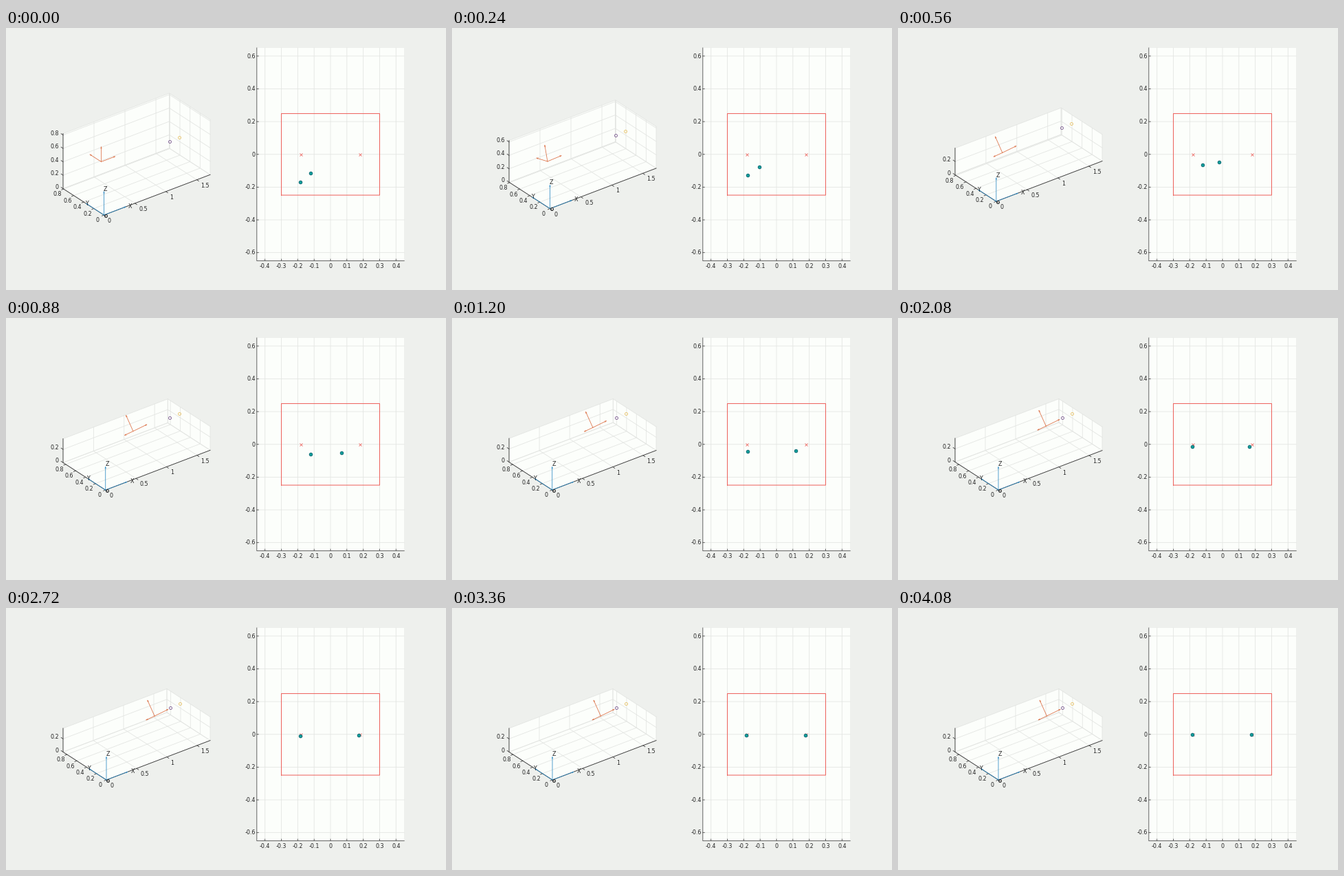
Animation, 640 px wide and 381 px high, one loop 4160 ms. Source, as a matplotlib script:

```python
import numpy as np
import matplotlib.pyplot as plt
from matplotlib.animation import FuncAnimation

W, H, DPI = 640, 381, 100
FRAMES, STEP = 52, 80
PT = 72 / DPI

BG, PANE, GRID, INK = "#eef0ed", "#fcfefb", "#e3e5e2", "#3a3a3a"
BLUE, ORANGE, PURPLE, YELLOW = "#2f8bc4", "#dd7248", "#74508c", "#e8c060"
RED, TEAL = "#ee5f5a", "#12a09c"

plt.rcParams["font.family"] = "DejaVu Sans"
fig = plt.figure(figsize=(W / DPI, H / DPI), dpi=DPI, facecolor=BG)
ax = fig.add_axes([0, 0, 1, 1])
ax.set_xlim(0, W)
ax.set_ylim(H, 0)
ax.axis("off")

live = []


def line(*pts, color=INK, w=0.8, z=2, **kw):
    xs, ys = zip(*pts)
    live.extend(ax.plot(xs, ys, color=color, lw=w * PT, zorder=z, snap=False, **kw))


def text(x, y, s, ha="center"):
    live.append(ax.text(x, y, s, ha=ha, va="center", size=8 * PT, color="#262626", zorder=6))


def fill(pts):
    live.extend(ax.fill(*zip(*pts), fc=PANE, ec="none", zorder=0))


def mark(p, shape, size, edge, w, face="none", z=5):
    live.extend(ax.plot(*p, shape, ms=size * PT, mfc=face, mec=edge, mew=w * PT,
                        zorder=z, snap=False))


def arrow(p, v, color, head=2.2):
    tip = p + v
    back = -v / np.hypot(*v) * head
    side = np.array([-back[1], back[0]]) * 0.35
    line(p, tip, color=color, z=4)
    line(tip + back + side, tip, tip + back - side, color=color, w=0.6, z=4)


def fall(t, half, power):
    """Ease from 1 to 0, passing one half at the given time."""
    return 1 / (1 + (t / half) ** power)


def bump(t, mid, width):
    return np.exp(-((t - mid) / width) ** 2)


def smooth(s):
    s = min(max(s, 0), 1)
    return s * s * (3 - 2 * s)


def scene(t):
    # The box flattens about its centre while the camera sinks.
    sink = np.exp(-(t / 0.34) ** 1.7)
    o = np.array([146 - 3.5 * fall(t, 0.8, 6), 250 + 22 * sink])
    xm = 1.716
    unit = (297 - o[0]) / xm
    ux = unit * np.array([1, -0.38])
    uy = unit * np.array([-0.815, -0.526])
    uz = unit * np.array([0, -1.083])
    ym, zm = (o[0] - 83) / -uy[0], (34.4 + 45.6 * sink) / -uz[1]

    def p(x, y, z):
        return o + x * ux + y * uy + z * uz

    fill([p(0, 0, 0), p(xm, 0, 0), p(xm, 0, zm), p(xm, ym, zm), p(0, ym, zm), p(0, ym, 0)])
    xt, yt, zt = np.arange(0, xm, 0.5), np.arange(0, ym, 0.2), np.arange(0, zm, 0.2)
    grid = dict(color=GRID, z=1)
    for x in [*xt, xm]:
        line(p(x, 0, 0), p(x, ym, 0), p(x, ym, zm), **grid)
    for y in [*yt, ym]:
        line(p(0, y, 0), p(xm, y, 0), p(xm, y, zm), **grid)
    for z in [*zt, zm]:
        line(p(0, ym, z), p(xm, ym, z), p(xm, 0, z), **grid)

    line(p(0, ym, zm), p(0, ym, 0), p(0, 0, 0), p(xm, 0, 0), w=0.9)
    for x in xt:
        a = p(x, 0, 0)
        line(a, a + (2.8, 1.9))
        text(a[0] + 5.5, a[1] + 8.5, f"{x:g}", "left")
    for y in yt:
        a = p(0, y, 0)
        line(a, a + (-3, 1.2))
        text(a[0] - 9.2, a[1] + 7.8, f"{y:.1g}")
    for z in zt:
        a = p(0, ym, z)
        line(a, a + (-2.8, -1.9))
        text(a[0] - 6, a[1] - 2.3, f"{z:.1g}", "right")

    for u in (ux, uy, uz):
        arrow(o, 0.35 * u, BLUE)
    for s, dx, dy in (("X", 38.5, -12.8), ("Y", -25.5, -16.7), ("Z", 2.2, -37.7)):
        text(o[0] + dx, o[1] + dy, s)
    mark(o + (2.4, 0.5), "o", 4, "#222222", 1, z=6)

    mark(p(1.6, 0.668, 0.211), "o", 4, PURPLE, 0.8)
    mark(p(1.6, 0.476, 0.367), "o", 4, YELLOW, 0.8)

    # The camera tilts about its x axis as it moves towards the two points.
    cam = np.array([216.5 - 78 * fall(t, 0.805, 4.35), 157 + 37.5 * fall(t, 0.645, 4.4)])
    turn = smooth(t / 0.6)
    c, s = np.cos(0.7 * turn), np.sin(0.7 * turn)
    for v in (ux + 0.1 * turn * uz, c * uy - s * uz, c * uz + s * uy):
        arrow(cam, 0.222 * v, ORANGE)


def image_plane(t):
    k, cx, cy = 238.2, 472, 183.75
    left, right, top, bottom = cx - 0.45 * k, cx + 0.45 * k, cy - 0.65 * k, cy + 0.65 * k

    def q(x, y):
        return cx + k * x, cy - k * y

    fill([(left, top), (right, top), (right, bottom), (left, bottom)])
    for i in range(-4, 5):
        x = q(i / 10, 0)[0]
        line((x, top), (x, bottom), color=GRID, z=1)
        line((x, bottom), (x, bottom - 2.5))
        text(x, 346.7, f"{i / 10:g}")
    for i in range(-3, 4):
        y = q(0, i / 5)[1]
        line((left, y), (right, y), color=GRID, z=1)
        line((left, y), (left + 2.5, y))
        text(left - 2, y + 0.3, f"{i / 5:g}", "right")
    line((left, top), (left, bottom), (right, bottom), color="#555555", w=0.9)

    a, b = 0.3, 0.249
    line(q(-a, -b), q(a, -b), q(a, b), q(-a, b), q(-a, -b), color=RED, w=1, z=3)
    for x in (-0.18, 0.18):
        mark(q(x, 0), "x", 4, RED, 0.8, z=4)

    drop = 40 * np.exp(-1.15 * t)
    goal = 0.18 * k
    dots = [(-goal - 0.8 + 18.5 * bump(t, 0.72, 0.32), drop - 6 * bump(t, 0.57, 0.18)),
            (goal - 71.5 * fall(t, 0.73, 2.75), drop - 12.5 * fall(t, 0.68, 6))]
    for dx, dy in dots:
        mark((cx + dx, cy + dy), "o", 4.6, "#0a6670", 0.9, TEAL)


def update(n):
    while live:
        live.pop().remove()
    t = n * STEP / 1000
    scene(t)
    image_plane(t)
    return live


anim = FuncAnimation(fig, update, frames=FRAMES, interval=STEP, init_func=lambda: update(0),
                     repeat=True, repeat_delay=0, blit=False)
plt.show()
```
